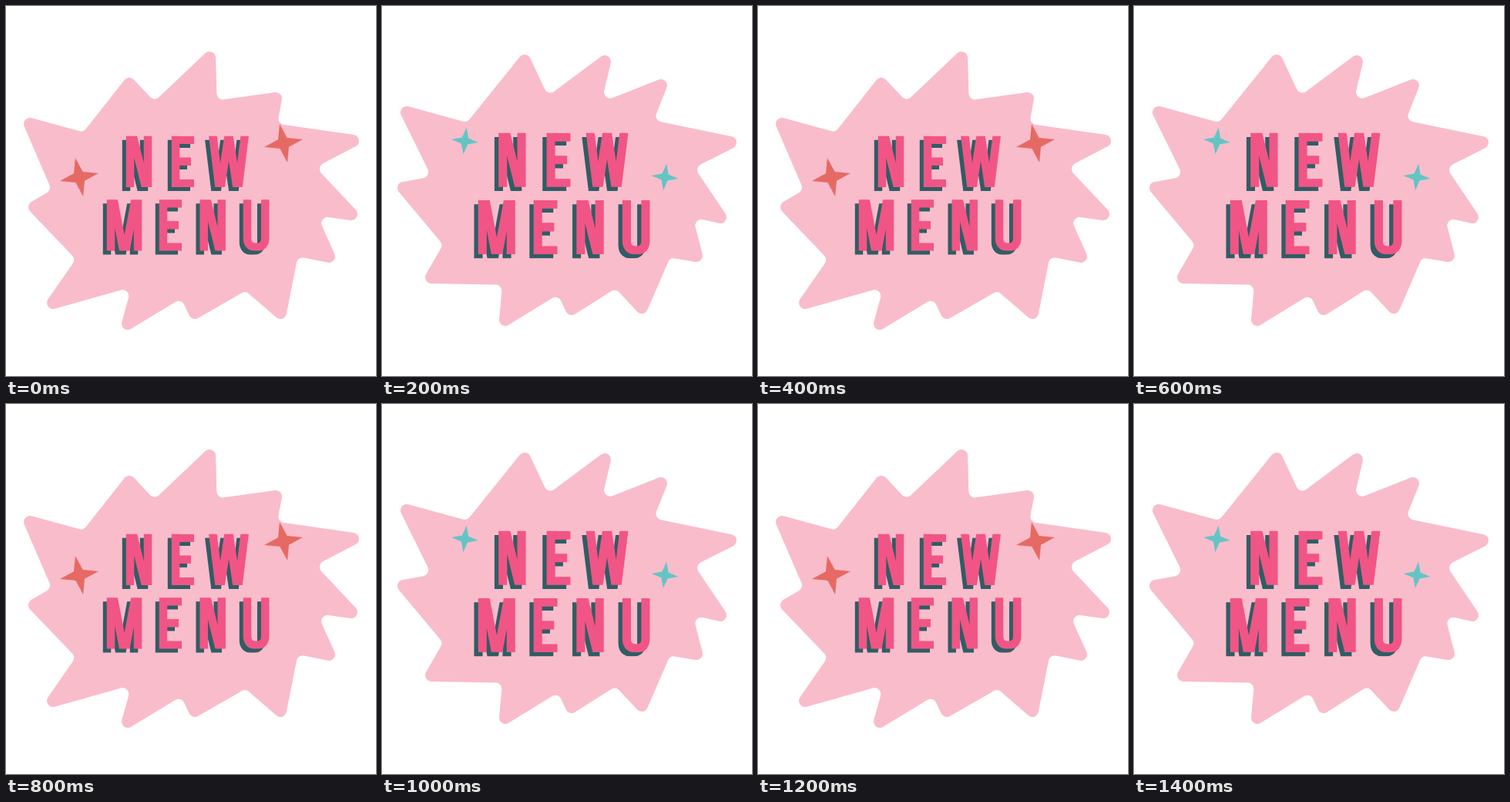
Write an HTML page with a canvas that moves like this. It is 480x480 px and loops after 1.6 s.

```html
<!DOCTYPE html>
<html lang="en">
<head>
<meta charset="utf-8">
<title>New menu</title>
<style>
html, body { margin: 0; width: 100%; height: 100%; overflow: hidden; background: #fff; }
canvas { display: block; }
</style>
</head>
<body>
<canvas id="stage" width="480" height="480" role="img" aria-label="NEW MENU"></canvas>
<script>
const ctx = document.getElementById('stage').getContext('2d');
const TAU = 2 * Math.PI;

// Letters as thick strokes, cut off flat at the top and the baseline
const CAP = 66.2;
const strokes = {
  N: 'M5 70V-3M8 -3L26 70M28 70V-3',
  E: 'M5 70V-3M5 5H29M5 33H25M5 61.5H29',
  W: 'M5 -3L14 70M26 -3L15 70M26 -3L37 70M47 -3L38 70',
  M: 'M5 70V-3M8 -3L22 70M37 -3L23.5 70M40 70V-3',
  U: 'M5 -3V50Q5 61.5 16.7 61.5Q28.2 61.5 28.2 50V-3'
};
const lines = [
  { text: 'NEW', xs: [156, 215, 263], y: 168.8 },
  { text: 'MENU', xs: [131, 199, 251.7, 308], y: 251.3 }
];

const poses = [
  {
    tips: [[31, 153], [160, 101], [264, 67], [350, 120], [450, 175], [448, 270],
      [419, 325], [356, 398], [245, 398], [158, 412], [61, 385], [37, 261]],
    middle: 250, stars: [[95, 222], [360, 178]],
    color: '#e56a63', size: 25.5, tilt: -0.2, scale: 1
  },
  {
    tips: [[32, 138], [185, 71], [289, 72], [362, 103], [452, 177], [439, 274],
      [408, 324], [337, 391], [246, 393], [160, 407], [64, 352], [28, 236]],
    middle: 245, stars: [[107.5, 175], [367, 222]],
    color: '#62c5c4', size: 17.5, tilt: 0.12, scale: 1.057
  }
];

// Every spike leans: the notch after it lies on an ellipse, 28% of the way to the next tip
function burstCorners({ tips, middle }) {
  const cx = 235, rx = 187, ry = 141;
  const angles = tips.map(([x, y]) => Math.atan2((y - middle) / ry, (x - cx) / rx));
  return tips.flatMap(([x, y], i) => {
    const gap = (angles[(i + 1) % tips.length] - angles[i] + TAU) % TAU;
    const a = angles[i] + 0.28 * gap;
    return [{ x, y, r: 8 }, { x: cx + rx * Math.cos(a), y: middle + ry * Math.sin(a), r: -8 }];
  });
}

// Outline around corner circles; a negative radius rounds a notch
function drawBurst(corners) {
  const n = corners.length;
  const normals = corners.map((a, i) => {
    const b = corners[(i + 1) % n], dx = b.x - a.x, dy = b.y - a.y;
    return Math.atan2(dy, dx) - Math.acos((a.r - b.r) / Math.hypot(dx, dy));
  });
  ctx.beginPath();
  corners.forEach(({ x, y, r }, i) => {
    const turn = r < 0 ? Math.PI : 0;
    ctx.arc(x, y, Math.abs(r), normals[(i + n - 1) % n] + turn, normals[i] + turn, r < 0);
  });
  ctx.fillStyle = '#f9bccb';
  ctx.fill();
}

function drawStar([x, y], { size, tilt, color }) {
  ctx.beginPath();
  for (let i = 0; i < 8; i++) {
    const r = i % 2 ? size * 0.33 : size, a = tilt + i * TAU / 8;
    ctx.lineTo(x + r * Math.cos(a), y + r * Math.sin(a));
  }
  ctx.fillStyle = color;
  ctx.fill();
}

function drawLine({ text, xs, y }) {
  ctx.save();
  ctx.translate(0, y);
  ctx.beginPath();
  ctx.rect(0, 0, 480, CAP);
  ctx.clip();
  let last = 0;
  xs.forEach((x, i) => {
    ctx.translate(x - last, 0);
    ctx.stroke(new Path2D(strokes[text[i]]));
    last = x;
  });
  ctx.restore();
}

function drawLettering(scale) {
  ctx.save();
  ctx.translate(236, 239);
  ctx.scale(scale, scale);
  ctx.translate(-241, -234);
  ctx.lineWidth = 10.5;
  for (const color of ['#305d64', '#f15585']) {
    ctx.strokeStyle = color;
    lines.forEach(drawLine);
    ctx.translate(5, -5);
  }
  ctx.restore();
}

function draw(time) {
  const pose = poses[Math.floor(time / 200) % 2];
  ctx.fillStyle = '#fff';
  ctx.fillRect(0, 0, 480, 480);
  drawBurst(burstCorners(pose));
  pose.stars.forEach(star => drawStar(star, pose));
  drawLettering(pose.scale);
}

let start;
function frame(now) {
  start ??= now;
  draw(now - start);
  requestAnimationFrame(frame);
}
draw(0);
requestAnimationFrame(frame);
</script>
</body>
</html>
```
